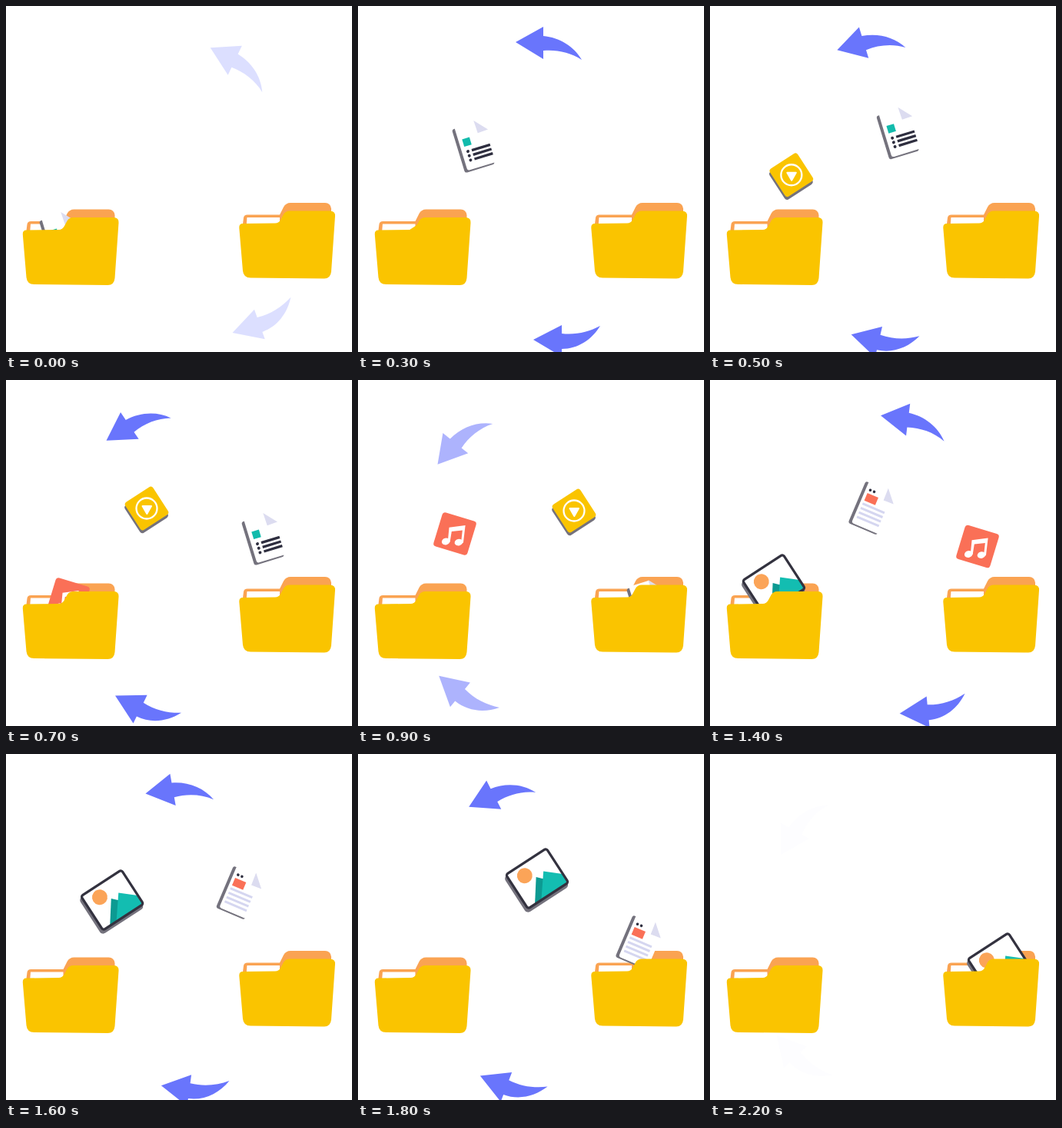
An HTML page for the animation above (2300 ms loop, 450 px wide and 450 px high).

```html
<!DOCTYPE html>
<html lang="en">
<head>
<meta charset="utf-8">
<title>Moving files between folders</title>
<style>
  html, body { margin: 0; width: 100%; height: 100%; overflow: hidden; background: #fff; }
  svg { display: block; width: 100vw; height: 100vh; }
  .arrow { fill: #6975fc; }
  .shade { fill: #74727d; }
  .ink { fill: #2e2e3f; }
  .lilac { fill: #dcdcf0; }
</style>
</head>
<body>
<svg viewBox="0 0 450 450" xmlns="http://www.w3.org/2000/svg">
  <defs>
    <g id="back">
      <path fill="#faa352" d="M26 300 L28 284 Q28.5 280 33 280 H75 L80 270 Q83 264.5 89 264.5 H134 Q141 264.5 142 272 V300 Z"/>
      <path fill="#fff" d="M32.500 283.500 H75 V296 H31.500 Z"/>
    </g>
    <path id="front" fill="#fac400" d="M22.300 297 Q22 291.500 27 291.500 L69 291 Q74 291 76.500 286 L80 279.500 Q82.500 275 88 275 H141 Q147.500 275.500 147 282 L142 354 Q141 363 133 363 L37 362 Q28 362 27 353 Z"/>
    <path id="sheet" d="M-15.500 -31 H8 L22 -16 V25 Q22 28 19 28 H-15.500 Q-18.500 28 -18.500 25 V-28 Q-18.500 -31 -15.500 -31 Z"/>
    <g id="page">
      <use href="#sheet" class="shade" x="-4" y="2"/>
      <use href="#sheet" fill="#fff"/>
      <path class="lilac" d="M8 -32 L22.500 -15.500 L8.500 -15 Z"/>
    </g>
  </defs>

  <path id="top" class="arrow" d="M205 47 L241 27 V39 C262 41 281 52.500 291 70 C276 60 258 56.500 241 58 V69 Z"/>
  <path id="bottom" class="arrow" d="M228 434 L265 415 V426 C283 428 300 424 315 416 C304 434 286 446 265 446 V456 Z"/>

  <use href="#back" x="-0.500"/>
  <use href="#back" x="281" y="-8.500"/>

  <g id="list">
    <use href="#page"/>
    <rect x="-13.500" y="-13" width="10" height="10" fill="#12bbac"/>
    <g class="ink">
      <rect x="-5.500" y="2.600" width="25" height="3.300"/>
      <rect x="-5.500" y="8.500" width="25" height="3.300"/>
      <rect x="-5.500" y="14.400" width="25" height="3.300"/>
      <circle cx="-10.700" cy="4.200" r="2"/>
      <circle cx="-10.700" cy="10.100" r="2"/>
      <circle cx="-10.700" cy="16" r="2"/>
    </g>
  </g>

  <g id="video">
    <rect class="shade" x="-24" y="-18.500" width="43" height="43" rx="4"/>
    <rect x="-21.500" y="-21.500" width="43" height="43" rx="4" fill="#fac400"/>
    <g transform="rotate(33)" stroke="#fff" stroke-linejoin="round">
      <circle r="13.500" fill="none" stroke-width="2.300"/>
      <path d="M-5.500 -3 H6 L0.300 7 Z" fill="#fff" stroke-width="2"/>
    </g>
  </g>

  <g id="music">
    <rect x="-23" y="-23" width="46" height="46" rx="4" fill="#fa7057"/>
    <g transform="rotate(-17) translate(-1.500 3) scale(1.080)" fill="#fff">
      <path d="M-5.500 -10.500 L14 -13 L11.500 8 H8.800 L10.500 -7 L-2.500 -5.500 L-4.500 7 H-7.200 Z"/>
      <ellipse cx="-9.500" cy="6.500" rx="5" ry="4" transform="rotate(-15 -9.500 6.500)"/>
      <ellipse cx="6" cy="7.500" rx="5" ry="4" transform="rotate(-15 6 7.500)"/>
    </g>
  </g>

  <g id="report">
    <use href="#page"/>
    <rect x="-14.500" y="-15.500" width="15.500" height="10.500" fill="#fa7057"/>
    <g class="ink">
      <circle cx="-12.500" cy="-20.500" r="1.800"/>
      <circle cx="-7" cy="-20.500" r="1.800"/>
    </g>
    <path d="M-15 -0.500 H16 M-15 5.700 H16 M-15 11.900 H16 M-15 18.100 H16" stroke="#d5d6f0" stroke-width="3"/>
  </g>

  <g id="picture">
    <rect class="shade" x="-36" y="-25" width="66" height="56" rx="5"/>
    <rect x="-31.400" y="-26.400" width="62.800" height="52.800" rx="3" fill="#fff"/>
    <circle cx="-11.500" cy="-12" r="10" fill="#fba458"/>
    <path fill="#0c9a92" d="M-20 25.500 L0 -2.500 L7 5 L-6 25.500 Z"/>
    <path fill="#13bdb1" d="M-10 25.500 L12 -3.500 L31 13 V25.500 Z"/>
    <rect x="-31.400" y="-26.400" width="62.800" height="52.800" rx="3" fill="none" stroke="#33323f" stroke-width="3.200"/>
  </g>

  <use href="#front" x="-0.500"/>
  <use href="#front" x="281" y="-8.500"/>
</svg>

<script>
const LOOP = 2300, STEP = 100, ARROW_CYCLE = 1183;
const el = id => document.getElementById(id);

// Every file follows the same arc; "via" holds points that it passes [ms, x, y].
const files = [
  { id: 'list', peak: 480, tilt: -17, via: [[0, 73, 301], [300, 152, 182], [700, 336, 206], [900, 379, 293]] },
  { id: 'video', peak: 800, tilt: -33, via: [[700, 183, 167], [900, 281, 170]] },
  { id: 'music', peak: 1140, tilt: 17, via: [[700, 81, 285], [900, 126, 200], [1400, 348, 216.5]] },
  { id: 'report', peak: 1445, tilt: 23, via: [[1400, 212, 167], [1800, 367, 245]] },
  { id: 'picture', peak: 1800, tilt: -33, via: [[1400, 83, 266], [1800, 233, 162], [2200, 376, 272]] }
];

function arc(ms) {
  const a = ms / 300;
  const dx = 150 * Math.sin(a);
  return [232 + dx, 162 + 138 * (1 - Math.cos(a)) + 0.04 * dx];
}

// Piecewise linear lookup, held at both ends.
function lerpTable(table, t, col) {
  if (t <= table[0][0]) return table[0][col];
  for (let i = 1; i < table.length; i++) {
    const a = table[i - 1], b = table[i];
    if (t <= b[0]) return a[col] + (b[col] - a[col]) * (t - a[0]) / (b[0] - a[0]);
  }
  return table[table.length - 1][col];
}

for (const f of files) {
  f.node = el(f.id);
  f.drift = f.via.map(([t, x, y]) => {
    const [ax, ay] = arc(t - f.peak);
    return [t, x - ax, y - ay];
  });
}

function placeFile(f, t) {
  const ms = t - f.peak;
  const shown = Math.abs(ms) <= 500;
  f.node.style.display = shown ? '' : 'none';
  if (!shown) return;
  const [x, y] = arc(ms);
  const px = x + lerpTable(f.drift, t, 1);
  const py = y + lerpTable(f.drift, t, 2);
  f.node.setAttribute('transform', `translate(${px} ${py}) rotate(${f.tilt})`);
}

const fade = [[-60, 0], [0, 0.23], [200, 1], [800, 1], [1020, 0]];

function placeArrow(id, s, rate, cx, cy) {
  el(id).setAttribute('opacity', lerpTable(fade, s, 1));
  el(id).setAttribute('transform', `rotate(${(s - 300) * rate} ${cx} ${cy})`);
}

function draw(now) {
  const t = Math.floor(now % LOOP / STEP) * STEP;
  const s = t < ARROW_CYCLE - 60 ? t : t - ARROW_CYCLE;
  placeArrow('top', s, -0.0855, 219.5, 184);
  placeArrow('bottom', s, 0.0655, 235.5, 237.5);
  for (const f of files) placeFile(f, t);
}

const start = performance.now();
function tick() {
  draw(performance.now() - start);
  requestAnimationFrame(tick);
}
tick();
</script>
</body>
</html>
```
